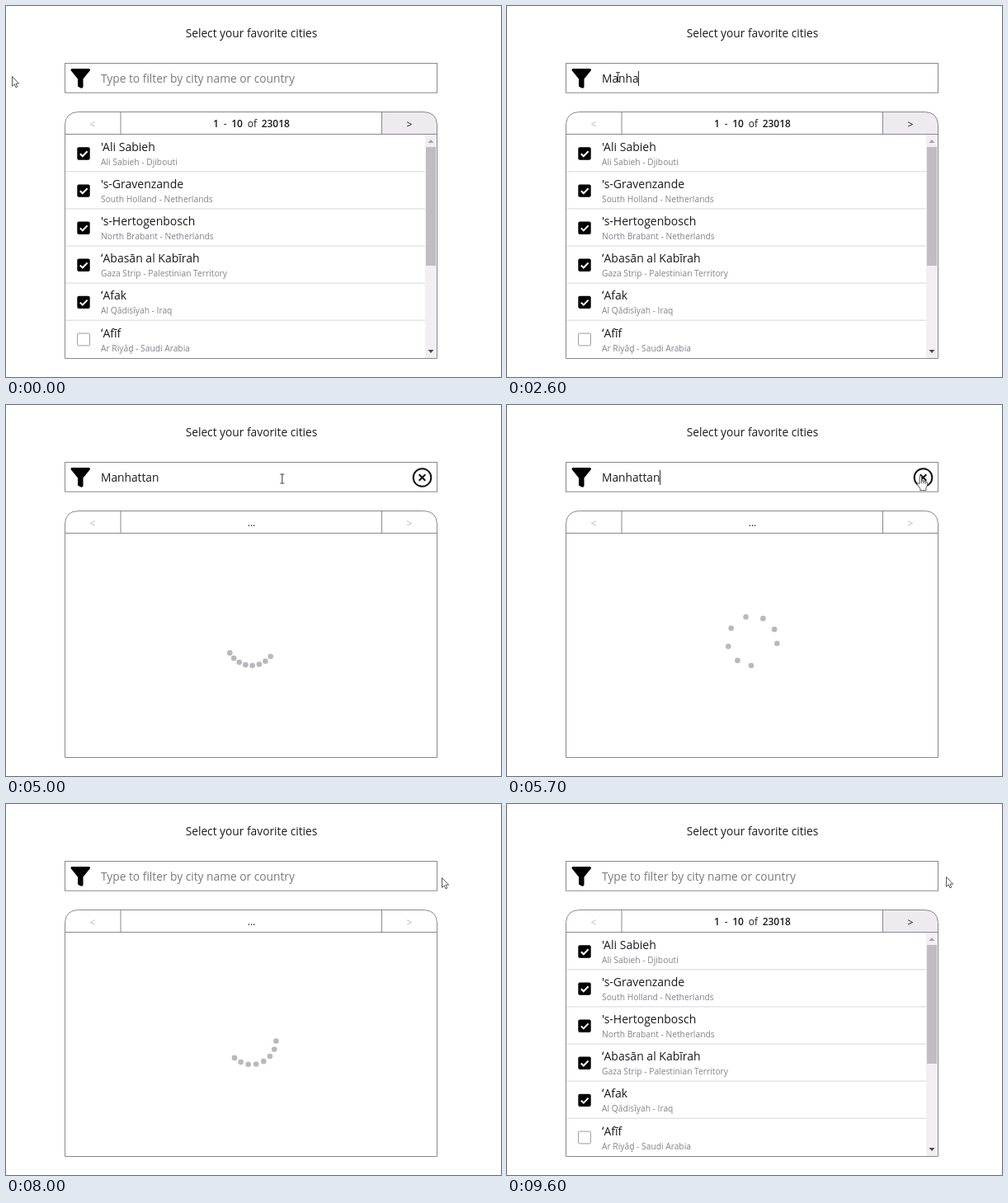
Animation, 600 px wide and 450 px high, one loop 9.7 s. Source, as an HTML page:

```html
<!DOCTYPE html>
<html lang="en">
<head>
<meta charset="utf-8">
<title>Favorite cities</title>
<style>
  html, body { margin: 0; width: 100%; height: 100%; overflow: hidden; background: #fff; }
  svg { display: block; width: 600px; height: 450px; }
  text { font-family: "Open Sans", "Noto Sans", sans-serif; font-size: 13.75px; fill: #1c1a1e; }
  .mid { text-anchor: middle; }
  .name { font-size: 14px; }
  .sub { font-size: 10.25px; fill: #85828a; }
  .hint { fill: #7b787f; }
  .count { font-size: 12px; word-spacing: 2.6px; }
  .count tspan { font-weight: 600; }
  .match { font-size: 13.4px; font-weight: 700; fill: #000; }
  .nav { font-size: 12px; }
  .frame { fill: none; stroke: #89878d; }
  .rule { stroke: #d8d6da; }
</style>
</head>
<body>
<svg viewBox="0 0 600 450">
  <defs><clipPath id="panel"><path d="M72 156H522V427H72Z"/></clipPath></defs>
  <text class="mid" x="297.5" y="38">Select your favorite cities</text>

  <rect class="frame" x="71.5" y="69.5" width="451" height="35.7"/>
  <path d="M78.5 78Q78.5 76 80 76H100.5Q102 76 102 78L93.5 88.5V98Q93 100.5 90 99.3L87 97.5V88.5Z"/>
  <text class="hint" id="hint" x="115" y="93">Type to filter by city name or country</text>
  <text id="typed" x="115" y="93"></text>
  <path id="caret" d="M.5 79V97" stroke="#333"/>
  <g id="clear" fill="none" stroke="#111" stroke-width="2">
    <circle cx="504.5" cy="88" r="10.8"/>
    <path d="M500.7 84.2l7.6 7.6m0-7.6l-7.6 7.6"/>
  </g>

  <path id="nextFill" d="M456 128.5H507Q522 129 522 143V155H456Z" fill="#eeebef"/>
  <g id="full" clip-path="url(#panel)"></g>
  <g id="found" clip-path="url(#panel)"></g>
  <g id="roller" fill="#bab7bd"></g>
  <path class="frame" d="M71.5 427.5V143.5Q72.5 129 87.5 128.5H506.5Q521.5 129 522.5 143.5V427.5ZM71.5 155.5H522.5M139 128.5V155.5M455.5 128.5V155.5"/>
  <text class="mid nav" x="105" y="147.5" style="fill:#b9b7bb">&lt;</text>
  <text class="mid nav" id="next" x="489" y="147.5">&gt;</text>
  <text class="mid count" id="fullCount" x="297.5" y="147"><tspan>1</tspan> - <tspan>10</tspan> of <tspan>23018</tspan></text>
  <text class="mid count" id="foundCount" x="297.5" y="147"><tspan>1</tspan> - <tspan>3</tspan> of <tspan>3</tspan></text>
  <text class="mid count" id="dots" x="297.5" y="147">...</text>

  <g id="cursor" fill="#fff" stroke="#444" stroke-width=".9">
    <path id="arrow" d="M.5 .5V12.3L3.2 9.8L5 13.8L6.8 13L5 9.1H8.6Z"/>
    <path id="beam" d="M-2.5 -5.5H2.5M0 -5.5V5.5M-2.5 5.5H2.5" stroke-width="1.1"/>
    <path id="hand" d="M-1.2 8V-1Q0 -2.4 1.2 -1V4L3.5 4.2L5.6 5L8 6V10.5L6.5 13V16H-.5V13.8L-4.2 8.6Q-4 6.4 -2.5 7.3ZM1.2 4V7.5M3.5 4.5V7.5M5.7 5.2V8"/>
  </g>
</svg>
<script>
const LOOP = 9700, FOCUS = 1700, KEYS_DONE = 3150, BLINK = 530;
const SEARCH = 3550, FOUND = 5750, RESET = 7050, RELOADED = 9250;
const SPIN = 1860, LAG = 0.019, PITCH = 45.1;
const WORD = "Manhattan";
const KEY_TIMES = [1800, 2100, 2300, 2500, 2600, 2700, 2800, 3000, 3100];
const PATH = [
  [0, 7, 85], [100, 7, 85], [400, 75, 87], [700, 134.5, 86], [4600, 134.5, 86],
  [5000, 334.5, 89.5], [5600, 500, 88], [5900, 504, 87], [7300, 504, 87],
  [7500, 517, 88], [7900, 528, 89], [9000, 528, 89], [9300, 532, 88]
];
const CITIES = [
  ["'Ali Sabieh", "Ali Sabieh - Djibouti"],
  ["'s-Gravenzande", "South Holland - Netherlands"],
  ["'s-Hertogenbosch", "North Brabant - Netherlands"],
  ["ʻAbasān al Kabīrah", "Gaza Strip - Palestinian Territory"],
  ["ʻAfak", "Al Qādisīyah - Iraq"],
  ["ʻAfīf", "Ar Riyāḑ - Saudi Arabia"]
];
const bold = `<tspan class="match">${WORD}</tspan>`;
const MATCHES = [
  [bold, "Kansas - United States"],
  [bold, "New York - United States"],
  [bold + " Beach", "California - United States"]
];

const $ = id => document.getElementById(id);
const show = (id, on) => { $(id).style.display = on ? "" : "none"; };

function row([name, place], i, checked) {
  const box = checked
    ? `<rect x="86.3" y="171.3" width="15.4" height="15.4" rx="2"/>
       <path d="M89.8 179.2l3 3l5.8-6" fill="none" stroke="#fff" stroke-width="2"/>`
    : `<rect x="86.6" y="171.6" width="14.8" height="14.8" rx="1" fill="#fff" stroke="#9b999e"/>`;
  return `<g transform="translate(0 ${(i * PITCH).toFixed(1)})">${box}
    <text class="name" x="115" y="176">${name}</text>
    <text class="sub" x="115" y="193">${place}</text>
    <path class="rule" d="M72 200.8H522"/></g>`;
}

$("full").innerHTML = CITIES.map((c, i) => row(c, i, i < 5)).join("") +
  `<path d="M508 156H522V427H508Z" fill="#f1eff2"/>
   <path d="M509 171H521V315H509Z" fill="#c0bdc2"/>
   <path d="M511.5 166L515 162L518.5 166Z" fill="#a5a3a8"/>
   <path d="M511.5 417L515 421L518.5 417Z" fill="#4c4a4e"/>`;
$("full").querySelector("g:last-of-type .rule").remove();
$("found").innerHTML = MATCHES.map((c, i) => row(c, i, false)).join("");
$("roller").innerHTML = '<circle r="3.3"/>'.repeat(8);
const balls = [...$("roller").children];

// cubic-bezier(.4, 0, 0, 1)
function swing(x) {
  let lo = 0, hi = 1;
  for (let i = 0; i < 24; i++) {
    const s = (lo + hi) / 2;
    if (1.2 * s * (1 - s) ** 2 + s ** 3 < x) lo = s; else hi = s;
  }
  return lo * lo * (3 - 2 * lo);
}

function spin(elapsed) {
  balls.forEach((ball, i) => {
    const turn = swing((elapsed / SPIN + LAG * (i + 1)) % 1);
    const angle = (45 + 15.2 * i + 360 * turn) * Math.PI / 180;
    ball.setAttribute("cx", 297.5 + 30 * Math.cos(angle));
    ball.setAttribute("cy", 286 + 30 * Math.sin(angle));
  });
}

function pointer(t) {
  const n = PATH.findIndex(p => p[0] > t);
  if (n < 0) return PATH[PATH.length - 1].slice(1);
  const [t0, x0, y0] = PATH[n - 1], [t1, x1, y1] = PATH[n];
  const k = (t - t0) / (t1 - t0);
  return [x0 + (x1 - x0) * k, y0 + (y1 - y0) * k];
}

function render(t) {
  const searching = t >= SEARCH && t < FOUND;
  const loading = searching || (t >= RESET && t < RELOADED);
  const found = t >= FOUND && t < RESET;
  const full = !loading && !found;
  const clearable = t >= SEARCH && t < RESET;
  const nextOn = full || (searching && t < SEARCH + 100);

  const typed = t < RESET ? WORD.slice(0, KEY_TIMES.filter(k => k <= t).length) : "";
  $("typed").textContent = typed;
  show("hint", !typed);
  const lit = t < KEYS_DONE || Math.floor((t - KEYS_DONE) / BLINK) % 2 === 0;
  show("caret", t >= FOCUS && t < RESET && lit);
  const end = typed ? $("typed").getComputedTextLength() : 0;
  $("caret").setAttribute("transform", `translate(${Math.floor(115 + end)} 0)`);

  show("clear", clearable);
  show("nextFill", nextOn);
  $("next").style.fill = nextOn ? "#1c1a1e" : "#b9b7bb";
  show("full", full);
  show("fullCount", full);
  show("found", found);
  show("foundCount", found);
  show("dots", loading);
  show("roller", loading);
  if (loading) spin(t - (searching ? SEARCH : RESET));

  const [x, y] = pointer(t);
  const outside = x < 71 || x > 523;
  const onClear = clearable && x > 493 && !outside;
  $("cursor").setAttribute("transform", `translate(${x} ${y})`);
  show("arrow", outside);
  show("hand", onClear);
  show("beam", !outside && !onClear);
}

const start = performance.now();
function tick() {
  render((performance.now() - start) % LOOP);
  requestAnimationFrame(tick);
}
tick();
</script>
</body>
</html>
```
